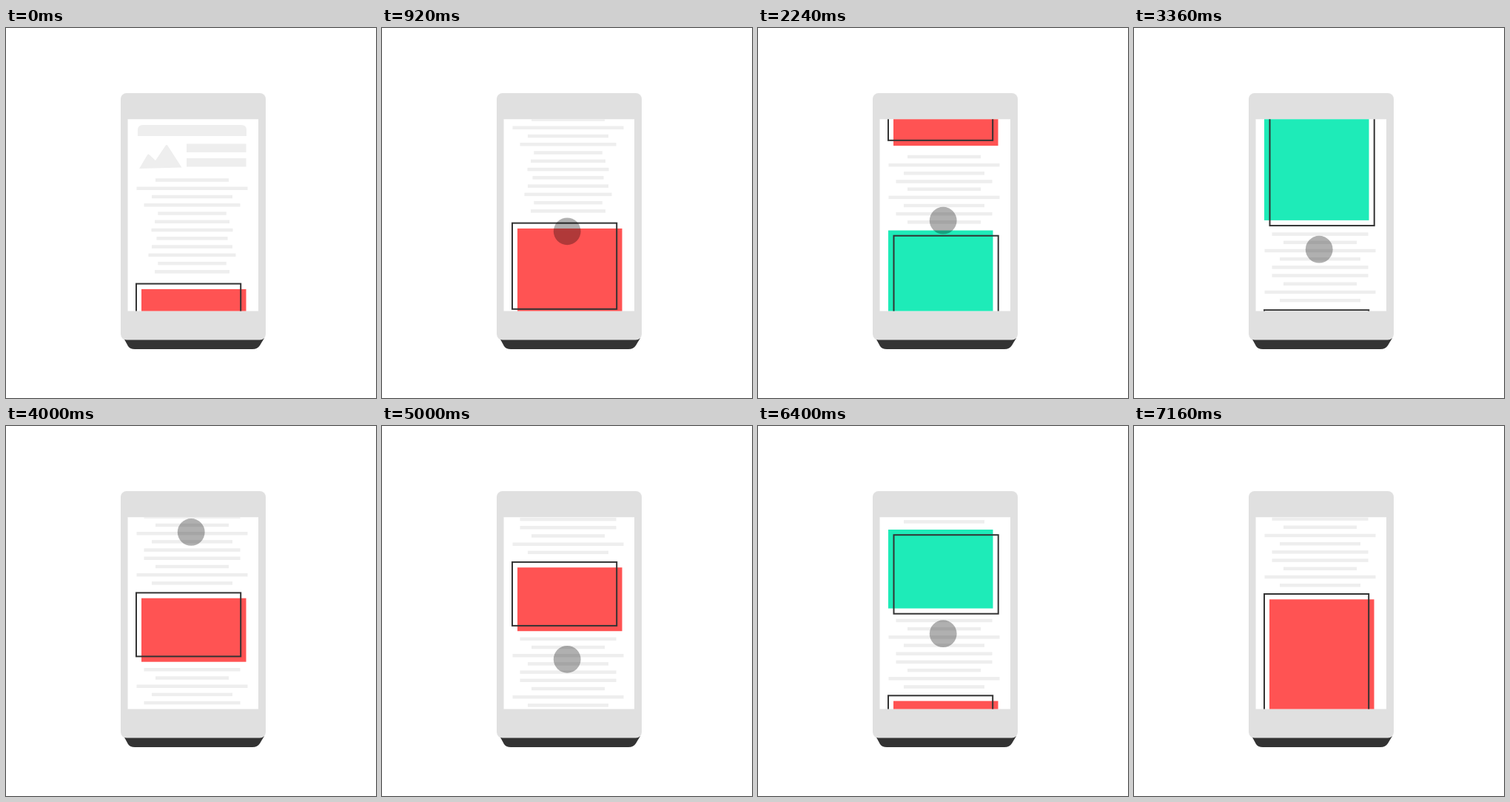
Animation of 500x500 px, one loop 8.68 s. Source, as an HTML page:

```html
<!DOCTYPE html>
<html lang="en">
<head>
<meta charset="utf-8">
<title>Scrolling phone</title>
<style>
  html, body { margin: 0; width: 100%; height: 100%; overflow: hidden; background: #fff; }
  svg { display: block; width: 100vw; height: 100vh; }
</style>
</head>
<body>
<svg viewBox="0 0 500 500">
  <defs><clipPath id="screen"><rect x="164.5" y="123.3" width="176.5" height="259.2"/></clipPath></defs>
  <path fill="#333" d="M159 419L165 430Q167.500 434 174 434H333Q340 434 343 429L349 419Z"/>
  <rect x="155" y="88" width="196" height="333.500" rx="8" fill="#e0e0e0"/>
  <g clip-path="url(#screen)">
    <rect x="164" y="123" width="178" height="260" fill="#fff"/>
    <g id="page">
      <g fill="#eee">
        <path d="M178 146V138Q178 131 185 131H318Q325 131 325 138V146Z"/>
        <path d="M180 190L191 171.500Q192.500 169.500 194 171.500L202 179L215.500 159Q217 157 218.500 159L237.500 188.500Z"/>
        <rect x="244" y="156.500" width="80.500" height="11.500"/>
        <rect x="244" y="176" width="80.500" height="11.500"/>
      </g>
    </g>
    <circle id="thumb" cx="250.200"/>
  </g>
</svg>
<script>
const LOOP = 8680, STEP = 40;
const STARTS = [600, 1863, 3135, 4838, 6103];
const SWIPE = 833, DIST = 213.4, TOUCH_Y = 356.8;
const LEAD = 183, REST = 113.5, FADE = 80;
const RED = '#ff5353', GREEN = '#1eebb8';
const page = document.getElementById('page');
const thumb = document.getElementById('thumb');
const clamp = v => Math.min(1, Math.max(0, v));

function rect(x, y, width, height, style) {
  const el = document.createElementNS('http://www.w3.org/2000/svg', 'rect');
  for (const [k, v] of Object.entries({ x, y, width, height, ...style })) el.setAttribute(k, v);
  page.append(el);
}

// Centred text lines; y is the middle of the first one
function lines(y, pitch, widths) {
  widths.forEach((w, i) => rect(251.5 - w / 2, y + i * pitch - 2.25, w, 4.5, { fill: '#eee' }));
}

function box(fill, x, y, frameX, frameY, h) {
  rect(x, y, 141.5, h, { fill });
  rect(frameX, frameY, 141.2, h, { fill: 'none', stroke: '#333', 'stroke-width': 2 });
}
const redBox = (y, h) => box(RED, 183, y + 7.3, 176, y, h);
const greenBox = (y, h) => box(GREEN, 176, y, 183.5, y + 7.2, h);

const A = 99, B = 150, C = 109, D = 130;
const paragraph = [D, A, B, C, D, D, A, B, C];

lines(205.5, 11.26, [A, B, C, D, 92.5, 101, 110, 96, C, 118, 92.5, 101]);
redBox(345.6, 116.2);
lines(484, 11.15, [A, B, C, D]);
lines(527.7, 11.15, [A, B, C, D, A]);
greenBox(583.5, 160.8);
lines(763, 11.2, paragraph);
redBox(865.6, 86);
lines(969.5, 11.2, paragraph);
greenBox(1069.7, 106.5);
lines(1192.6, 11.2, paragraph);
redBox(1294, 170);

function draw(now) {
  const t = Math.floor((now % LOOP) / STEP) * STEP;
  let scroll = 0, size = 0, y = TOUCH_Y;
  for (const start of STARTS) {
    const dt = t - start;
    const moved = clamp(dt / SWIPE) * DIST;
    const shown = Math.min(clamp((dt + LEAD) / FADE), 1 - clamp((dt - SWIPE - REST) / FADE));
    scroll += moved;
    if (shown > 0) {
      size = shown;
      y = TOUCH_Y - moved;
    }
  }
  page.setAttribute('transform', `translate(0 ${-scroll})`);
  thumb.setAttribute('cy', y);
  thumb.setAttribute('r', 18.4 * size);
  thumb.setAttribute('opacity', 0.31 * size);
}

const t0 = performance.now();
function tick() {
  draw(performance.now() - t0);
  requestAnimationFrame(tick);
}
tick();
</script>
</body>
</html>
```
